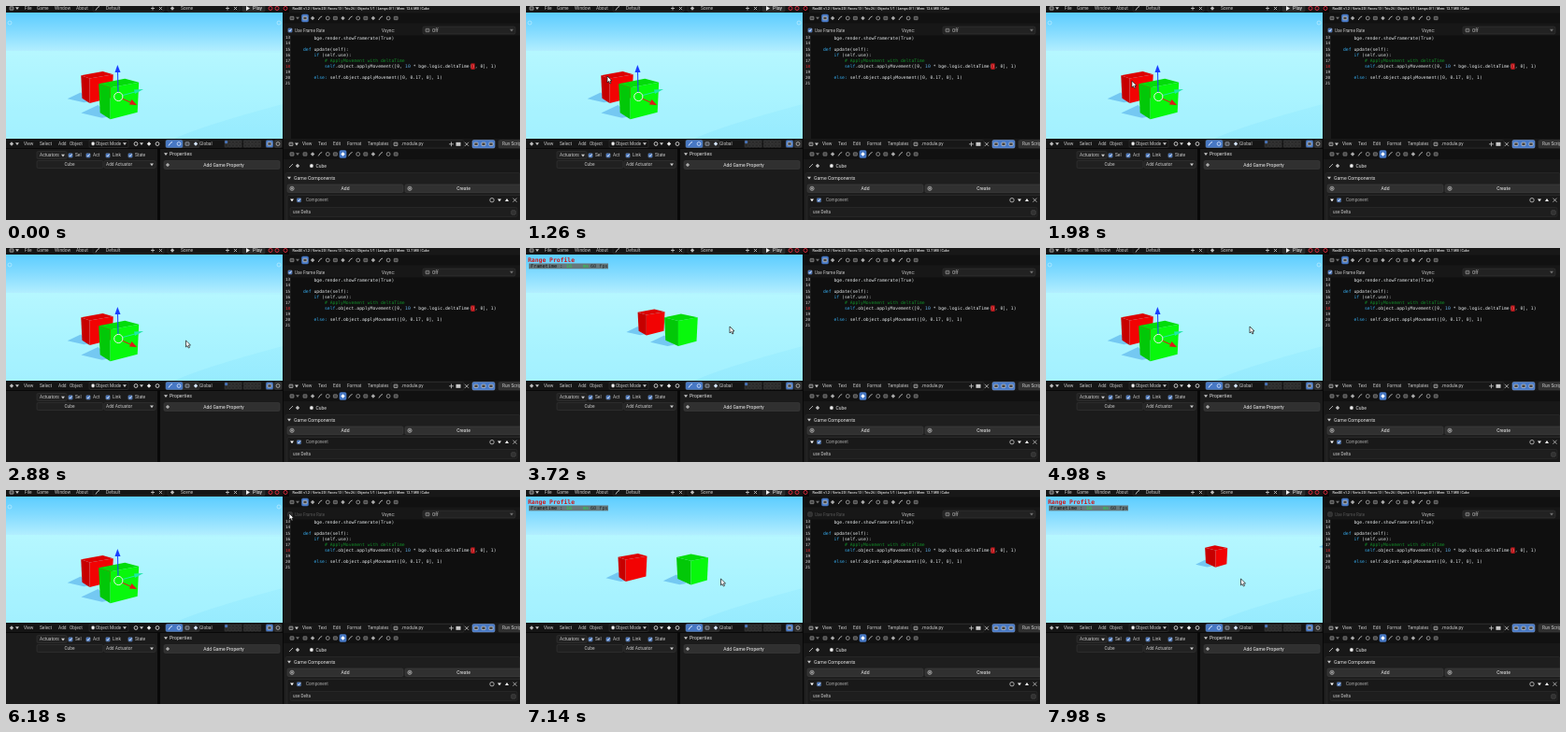
An HTML page with a canvas that plays this animation: 550 by 229 pixels, repeating every 8 s.

```html
<!DOCTYPE html>
<html lang="en">
<head>
<meta charset="utf-8">
<title>Delta time demo</title>
<style>
html, body { margin: 0; width: 100%; height: 100%; overflow: hidden; background: #111; }
canvas { display: block; width: 100%; height: 100%; }
</style>
</head>
<body>
<canvas id="stage" width="550" height="229"></canvas>
<script>
const ctx = document.getElementById('stage').getContext('2d');
const LOOP = 8000, STEP = 60;
const BLUE = '#4778c4', PALE = '#c9c9c9', DIM = '#707070';
const SANS = 'Roboto, "Noto Sans", sans-serif';
const MONO = '"DejaVu Sans Mono", monospace';

const RUNS = [
  { start: 3400, end: 4940, greenSpeed: 1 },
  { start: 7025, end: 8000, greenSpeed: 4 }
];
const UNCHECKED_AT = 6100, MEMORY_AT = 1680;

// Pointer stops: time, x, y
const POINTER = [
  [840, 503, 68], [1220, 87, 75], [1500, 87, 75], [1740, 108, 90],
  [2040, 90, 79], [2460, 128, 91], [2640, 128, 91], [2880, 192.5, 99],
  [3120, 218, 84], [5220, 218, 84], [5940, 302, 25], [6060, 303, 25],
  [6360, 303, 25], [6900, 208.5, 95]
];

function rect(x, y, w, h, color) {
  ctx.fillStyle = color;
  ctx.fillRect(x, y, w, h);
}

function box(x, y, w, h, color, border = '#3a3a3a', radius = 1.5) {
  ctx.beginPath();
  ctx.roundRect(x, y, w, h, radius);
  ctx.fillStyle = color;
  ctx.fill();
  ctx.strokeStyle = border;
  ctx.lineWidth = .5;
  ctx.stroke();
}

function poly(color, ...points) {
  ctx.beginPath();
  points.forEach(([x, y]) => ctx.lineTo(x, y));
  ctx.closePath();
  ctx.fillStyle = color;
  ctx.fill();
}

function line(color, width, ...points) {
  ctx.beginPath();
  points.forEach(([x, y]) => ctx.lineTo(x, y));
  ctx.strokeStyle = color;
  ctx.lineWidth = width;
  ctx.stroke();
}

function ring(x, y, r, color, width = .8) {
  ctx.beginPath();
  ctx.arc(x, y, r, 0, Math.PI * 2);
  ctx.strokeStyle = color;
  ctx.lineWidth = width;
  ctx.stroke();
}

function text(str, x, y, color = PALE, size = 4.8, font = SANS, align = 'left', weight = 400) {
  ctx.font = `${weight} ${size}px ${font}`;
  ctx.textAlign = align;
  ctx.textBaseline = 'middle';
  ctx.fillStyle = color;
  ctx.fillText(str, x, y);
}

function labels(y, ...items) {
  items.forEach(([str, x]) => text(str, x, y));
}

function check(x, y, on = true) {
  box(x - 2.3, y - 2.3, 4.6, 4.6, on ? BLUE : '#303030', '#555', 1);
  if (on) line('#fff', .8, [x - 1.3, y], [x - .3, y + 1.2], [x + 1.5, y - 1.4]);
}

function arrowDown(x, y, color = PALE) {
  poly(color, [x - 2, y - 1.2], [x + 2, y - 1.2], [x, y + 1.6]);
}

function plus(x, y, r, color = PALE, width = .8) {
  line(color, width, [x - r, y], [x + r, y]);
  line(color, width, [x, y - r], [x, y + r]);
}

function cross(x, y, r, color = PALE) {
  line(color, .8, [x - r, y - r], [x + r, y + r]);
  line(color, .8, [x + r, y - r], [x - r, y + r]);
}

function icon(x, y, kind, color = '#bbb') {
  const shape = kind % 4;
  if (shape === 0) ring(x, y, 1.9, color);
  else if (shape === 1) box(x - 2, y - 1.7, 4, 3.4, '#444', color, .5);
  else if (shape === 2) poly(color, [x, y - 2.2], [x + 2.2, y], [x, y + 2.2], [x - 2.2, y]);
  else line(color, 1, [x - 2, y + 2], [x, y - 1], [x + 2, y - 2]);
}

function iconRow(y, active) {
  icon(306, y, 1);
  arrowDown(312, y, DIM);
  for (let i = 0; i < 13; i++) {
    const x = 320 + i * 8.1;
    if (i === active) box(x - 3.6, y - 4, 7.2, 8, BLUE, BLUE);
    icon(x, y, i + 1, i === active ? '#fff' : '#aaa');
  }
}

function cube(x, y, w, h, split, [left, right, top]) {
  const l = x - w / 2, r = x + w / 2, t = y - h / 2, b = y + h / 2;
  const m = l + w * split, back = r - w * split * 1.2;
  const dl = h * (.06 + split * .12), dr = h * (.16 - split * .12);
  const ly = t + dr, ry = t + dl, my = t + dl + dr;
  poly(left, [l, ly], [m, my], [m, b], [l + w * .035, b - dl * 1.7]);
  poly(right, [m, my], [r, ry], [r - w * .035, b - dr * 1.4], [m, b]);
  poly(top, [l, ly], [back, t], [r, ry], [m, my]);
}

const RED = ['#c60000', '#f20303', '#dc0000'];
const GREEN = ['#02c808', '#08f80c', '#02dc0a'];

function shadow(x, y, s) {
  poly('#74c8f2', [x - .92 * s, y + .36 * s], [x - .5 * s, y + .16 * s],
    [x - .2 * s, y + .44 * s], [x - .4 * s, y + .48 * s]);
}

// Perspective track: d is the distance travelled, x0, y0 and s0 the look at d = 0.
function movingCube(d, x0, y0, s0, colors) {
  const depth = 1 + .29 * d;
  const x = (x0 + 121 * d) / depth, y = (y0 + 8.6 * d) / depth, s = s0 / depth;
  const split = Math.min(.75, Math.max(.26, .28 + (x - 120) * .003));
  shadow(x, y, s);
  cube(x, y, s, s * .97, split, colors);
}

function gradient(y, h, ...colors) {
  const fill = ctx.createLinearGradient(0, y, 0, y + h);
  colors.forEach((c, i) => fill.addColorStop(i / (colors.length - 1), c));
  rect(0, y, 296, h, fill);
}

function background() {
  gradient(7, 42, '#5ccdff', '#86dcff', '#b4efff');
  gradient(48, 94, '#b2f4ff', '#a2f0ff', '#97ebfe');
  ctx.fillStyle = 'rgba(190,250,255,.3)';
  ctx.beginPath();
  ctx.moveTo(0, 48);
  ctx.lineTo(296, 50);
  ctx.lineTo(296, 105);
  ctx.quadraticCurveTo(210, 128, 180, 142);
  ctx.lineTo(0, 142);
  ctx.fill();
}

function gizmo() {
  line('#1fe6a8', 1, [125, 95.5], [138, 92]);
  poly('#1fe6a8', [137, 89.5], [147, 89], [138, 94]);
  line('#1a3fff', 1, [120, 92], [119.5, 70]);
  poly('#1a3fff', [116.5, 71], [119.3, 63], [122.5, 71]);
  line('#e01818', 1, [124, 99], [134, 103.5]);
  poly('#e01818', [132, 105.5], [134.5, 100], [140, 106]);
  ring(120.3, 97, 4.6, '#eee', 1);
}

function profile() {
  text('Range Profile', 2, 13, '#d01818', 6.4, MONO, 'left', 700);
  rect(3, 16.5, 85, 5.8, '#65777b');
  text('Frametime :', 5, 19.5, '#101010', 5.2, MONO);
  text('16', 43, 19.5, '#25d84b', 5.2, MONO);
  text('ms', 61, 19.5, '#25d84b', 5.2, MONO);
  text('60 fps', 69, 19.5, '#252d30', 5.2, MONO);
}

function viewport(t) {
  const run = RUNS.find(r => t >= r.start && t < r.end);
  ctx.save();
  ctx.beginPath();
  ctx.rect(0, 7, 296, 135);
  ctx.clip();
  background();
  if (run) {
    const travelled = (t - run.start) / 840;
    movingCube(-.137 + travelled, 114, 83, 31, RED);
    movingCube(-.547 + travelled * run.greenSpeed, 178, 85, 34, GREEN);
    profile();
  } else {
    shadow(97, 87, 34);
    shadow(120, 99, 43);
    cube(97.5, 87, 34.5, 34, .27, RED);
    cube(120.7, 99.5, 43, 43.5, .29, GREEN);
    gizmo();
    [4, 292].forEach(x => ring(x, 18, 2, '#c8f0ff', .6));
  }
  ctx.restore();
}

function leftPanels() {
  rect(0, 0, 296, 7, '#151515');
  icon(6, 2.5, 1, '#eee');
  arrowDown(12, 2.5);
  labels(2.5, ['File', 20], ['Game', 33], ['Window', 52], ['About', 75], ['Default', 107], ['Scene', 187]);
  box(93, -2, 76, 8, 'transparent');
  box(173, -2, 77, 8, 'transparent');
  icon(98, 2.5, 3);
  icon(178, 2.5, 2);
  [157, 237].forEach(x => {
    plus(x, 2.5, 2);
    cross(x + 8.5, 2.5, 1.6);
  });
  box(253, -2, 24, 8, '#292929');
  poly('#eee', [257, 0], [261, 2.5], [257, 5]);
  text('Play', 264, 2.5, '#eee', 5.4);
  [283, 290, 299].forEach(x => ring(x, 2.5, 2, '#d02a3c', 1));

  rect(0, 142, 296, 10, '#151515');
  icon(6, 147.5, 2);
  arrowDown(12, 147.5);
  labels(147.5, ['View', 19], ['Select', 36], ['Add', 56], ['Object', 68], ['Object Mode', 96]);
  box(89, 143.5, 42, 8, 'transparent');
  box(91.3, 145.3, 3.6, 4, '#eee');
  arrowDown(127, 147.5);
  [139, 153, 162].forEach((x, i) => icon(x, 147.5, i * 2, '#eee'));
  arrowDown(145, 147.5);
  box(171, 143.5, 36, 8, '#292929');
  box(171, 143.5, 18, 8, BLUE, '#5b82b5');
  for (let i = 0; i < 4; i++) icon(176 + i * 9, 147.5, i + 3, '#d7e6ff');
  text('Global', 207, 147.5);
  for (let i = 0; i < 20; i++) {
    const x = 234 + (i % 10) * 3.7 + (i % 10 > 4 ? 2 : 0), y = 144 + (i > 9 ? 3.7 : 0);
    box(x, y, 3.3, 3.3, i ? '#292929' : BLUE, '#454545', .3);
  }
  box(278, 143.5, 8, 8, BLUE);
  box(287, 143.5, 8, 8, '#303030');
  icon(282, 147.5, 1, '#fff');
  icon(291, 147.5, 0);

  rect(0, 153, 162, 76, '#1b1b1b');
  rect(165, 153, 131, 76, '#1b1b1b');
  box(33, 155.5, 32, 8, '#222');
  text('Actuators', 36, 159.9);
  arrowDown(61, 159.9);
  [['Sel', 69], ['Act', 88], ['Link', 109], ['State', 133]].forEach(([s, x]) => {
    check(x, 159.9);
    text(s, x + 5, 159.9);
  });
  box(33, 165.5, 71, 8, '#202020');
  text('Cube', 68, 169.6, PALE, 4.8, SANS, 'center');
  box(105, 165.5, 55, 8, '#222');
  text('Add Actuator', 107, 169.6);
  arrowDown(156, 169.6);
  arrowDown(171, 158.5);
  text('Properties', 175, 158.7, '#e0e0e0', 5.2);
  box(169, 165.5, 124, 9, '#303030', '#404040');
  plus(173, 170, 2, '#eee');
  text('Add Game Property', 233, 170.2, '#eee', 5, SANS, 'center');
}

function code() {
  const rowY = row => 34.3 + (row - 13) * 6.07;
  const at = (row, col, str, color = '#e2e6e8') =>
    text(str, 306.5 + col * 2.87, rowY(row), color, 4.767, MONO);
  const key = '#35a8ea', num = '#64aee8', mark = '#e0282c';
  rect(297, 31.5, 8, 110.5, '#1b1b1b');
  for (let row = 13; row <= 21; row++)
    text(String(row), 299, rowY(row), row === 18 ? mark : '#d8d8d8', 4.3, MONO);
  at(13, 8, 'bge.render.showFramerate(True)');
  at(15, 4, 'def', key);
  at(15, 8, 'update(self):');
  at(16, 8, 'if', key);
  at(16, 11, '(self.use):');
  at(17, 12, '# ApplyMovement with deltaTime', '#128a28');
  at(18, 12, 'self', key);
  at(18, 16, '.object.applyMovement([0,');
  at(18, 42, '10', num);
  at(18, 45, '* bge.logic.deltaTime');
  rect(497.6, rowY(18) - 3.2, 4, 6.4, '#c0181c');
  at(18, 66, '()', '#ff8a8a');
  at(18, 68, ', 0], 1)');
  at(20, 8, 'else:', key);
  at(20, 14, 'self.object.applyMovement([0, 0.17, 0], 1)');
}

function rightPanels(t) {
  rect(303, 0, 247, 8, '#181818');
  rect(297, 7, 253, 222, '#181818');
  const memory = t < MEMORY_AT ? '12.6' : '12.7';
  text(`RanGE v1.2 | Verts:20 | Faces:13 | Tris:26 | Objects:1/1 | Lamps:0/1 | Mem: ${memory} MB | Cube`,
    306.5, 2.6, '#e4e4e4', 3.65, SANS, 'left', 500);
  rect(297, 7.5, 253, 11, '#111');
  iconRow(13, 0);
  rect(297, 19, 253, 12.5, '#171717');
  const on = t < UNCHECKED_AT;
  check(304, 26, on);
  text('Use Frame Rate', 309, 26.2, on ? PALE : '#555', 4.6);
  text('Vsync:', 402, 26.2);
  box(446, 22, 99, 8, '#222');
  icon(451, 26, 1);
  text('Off', 456, 26.2);
  arrowDown(541, 26, DIM);
  rect(297, 31.5, 253, 110.5, '#0f0f0f');
  code();

  rect(297, 142, 253, 11, '#171717');
  icon(305, 147.8, 1, '#eee');
  arrowDown(311, 147.8);
  labels(147.8, ['View', 317], ['Text', 334], ['Edit', 350], ['Format', 365], ['Templates', 387]);
  box(412, 143.5, 78, 8.5, 'transparent');
  icon(417, 147.8, 1, '#eee');
  text('.module.py', 423, 147.8);
  plus(476.5, 147.8, 2.4);
  rect(481.5, 145.8, 5, 4, PALE);
  cross(493, 147.8, 2);
  box(499, 143.5, 24, 8.5, BLUE, '#88a9df');
  [503, 511, 519].forEach(x => icon(x, 147.8, 1, '#fff'));
  box(527, 143.5, 28, 8.5, '#303030');
  text('Run Script', 531, 147.8);

  rect(297, 153, 253, 11, '#111');
  iconRow(158.5, 5);
  line(PALE, .8, [303, 173], [307, 169]);
  icon(312, 171, 2);
  box(325, 169, 3.8, 4, '#eee');
  text('Cube', 331.5, 171.2, '#ddd', 5);
  box(299, 178.5, 251, 55, '#1e1e1e', '#303030');
  arrowDown(303, 184);
  text('Game Components', 308, 184.2, '#e0e0e0', 5.2);
  [['Add', 301, 124], ['Create', 427, 125]].forEach(([s, x, w]) => {
    box(x, 191, w, 8.5, '#303030', '#444');
    ring(x + 5, 195.3, 2.1, '#ddd', .6);
    plus(x + 5, 195.3, 1.2, '#ddd', .6);
    text(s, x + w / 2, 195.5, '#eee', 5, SANS, 'center');
  });
  box(301, 202.5, 251, 30, '#191919', '#343434');
  arrowDown(306, 207.7, '#fff');
  check(313.5, 207.7);
  text('Component', 321, 207.9, '#a8a8a8', 4.6);
  ring(520, 207.7, 2.2, PALE);
  arrowDown(528, 207.7, '#fff');
  poly('#fff', [534, 209], [538, 209], [536, 206]);
  cross(544.5, 207.7, 2);
  box(304, 215.5, 243, 10, '#1e1e1e', '#303030');
  text('use Delta', 307, 221, PALE, 4.6);
  check(543, 221, false);
}

function pointer(t) {
  if (t < POINTER[0][0]) return;
  let i = 0;
  while (i < POINTER.length - 1 && t >= POINTER[i + 1][0]) i++;
  const [t0, x0, y0] = POINTER[i], [t1, x1, y1] = POINTER[i + 1] || [t + 1, x0, y0];
  const u = (t - t0) / (t1 - t0), e = u * u * (3 - 2 * u);
  const x = x0 + (x1 - x0) * e, y = y0 + (y1 - y0) * e;
  if (x > 297 && y > 33) {
    line('#ddd', .6, [x, y - 3], [x, y + 3]);
    return;
  }
  const outline = [[0, 0], [0, 7], [1.6, 5.5], [2.8, 8], [4, 7.4], [2.9, 5], [5, 4.9]]
    .map(([dx, dy]) => [x + dx, y + dy]);
  poly('#fff', ...outline);
  line('#111', .7, ...outline, outline[0]);
}

function draw(now) {
  const t = Math.floor((now % LOOP) / STEP) * STEP;
  rect(0, 0, 550, 229, '#080808');
  viewport(t);
  rightPanels(t);
  leftPanels();
  pointer(t);
}

const begin = performance.now();
function tick() {
  draw(performance.now() - begin);
  requestAnimationFrame(tick);
}
tick();
</script>
</body>
</html>
```
